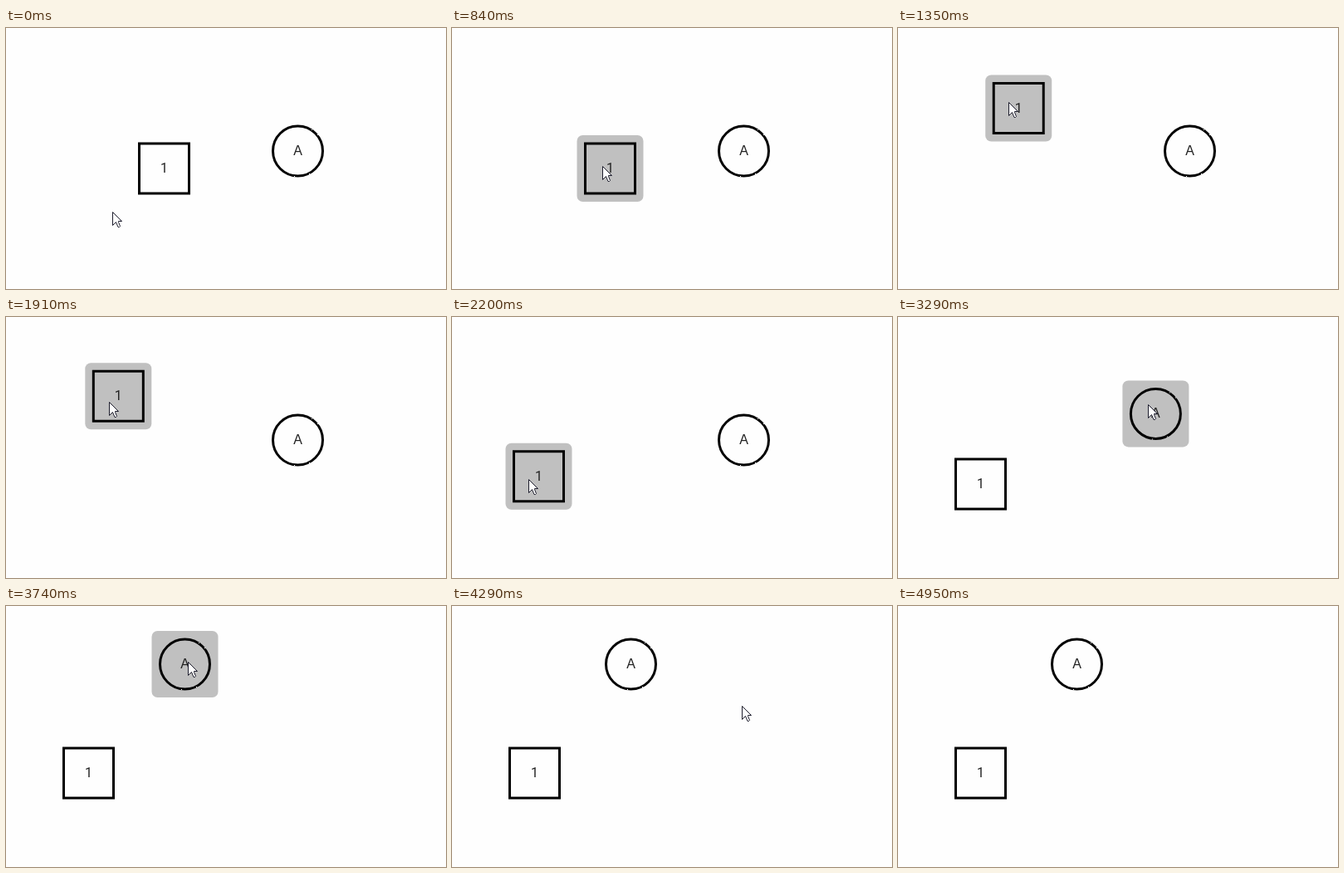
An HTML page for the animation above (5.27 s loop, 530 by 314 pixels).

```html
<!DOCTYPE html>
<html lang="en">
<head>
<meta charset="utf-8">
<title>Dragging shapes</title>
<style>
  html, body { margin: 0; width: 100%; height: 100%; overflow: hidden; background: #fefefe; }
  svg { display: block; width: 530px; height: 314px; }
  text { font: 16px "Liberation Sans", Arial, sans-serif; text-anchor: middle; fill: #222; }
  .digit { font-family: Roboto, sans-serif; }
  .halo { fill: #c0c0c0; }
  .line { fill: none; stroke: #000; stroke-width: 3; }
  .nick { fill: #fff; }
</style>
</head>
<body>
<svg viewBox="0 0 530 314">
  <defs>
    <rect id="halo" x="-40" y="-40" width="80" height="80" rx="7"/>
  </defs>
  <g id="circle">
    <use class="halo" href="#halo"/>
    <circle class="line" r="30"/>
    <path class="nick" d="M16.5-26h1v1h-1z M23.5-20h1v1h-1z M-4.5 30h1v1h-1z M13.5 27h1v1h-1z"/>
    <text y="5">A</text>
  </g>
  <g id="square">
    <use class="halo" href="#halo"/>
    <rect class="line" x="-30" y="-30" width="60" height="60"/>
    <text class="digit" y="5">1</text>
  </g>
  <path id="cursor" fill="#fff" stroke="#1c1c2c"
    d="M.5 .5V16.5L4.5 12.5L7 18.5H8.5L9.5 17.5L7.5 12.5V11.5H11.5Z"/>
</svg>
<script>
const LOOP = 5270;
const FIRST = 245;  // time of the first step
const STEP = 138;   // the picture advances in steps of this length
const LAG = 0.25;   // a dragged shape trails the hand by this many steps

const $ = id => document.getElementById(id);
const clamp = (v, lo, hi) => Math.min(hi, Math.max(lo, v));
const smooth = u => u * u * (3 - 2 * u);

// Eased strokes of the hand, timed in steps; "via" bends the way.
const home = { x: 128, y: 221 };
const strokes = [
  { start: -1,   end: 2.7,  to: { x: 181, y: 166 } },
  { start: 4.1,  end: 9,    to: { x: 127, y: 79.5 } },
  { start: 11.1, end: 14.3, to: { x: 90,  y: 198 }, via: { x: 123, y: 139 } },
  { start: 15.5, end: 19.2, to: { x: 355, y: 145 }, via: { x: 240, y: 140 } },
  { start: 20.4, end: 24.1, to: { x: 219, y: 67 },  via: { x: 287, y: 87 } },
  { start: 26.4, end: 33.9, to: { x: 497, y: 330 }, via: { x: 490, y: 150 } }
];

const shapes = [
  { el: $("square"), x: 190.5, y: 169, grab: 2.7,  drop: 15.5 },
  { el: $("circle"), x: 351.5, y: 148, grab: 20.4, drop: 26.4 }
];

function bend(a, b, c, s) {
  const r = 1 - s;
  return r * r * a + 2 * r * s * b + s * s * c;
}

function hand(step) {
  let from = home;
  for (const { start, end, to, via } of strokes) {
    if (step < end) {
      const s = smooth(clamp((step - start) / (end - start), 0, 1));
      const mid = via || { x: (from.x + to.x) / 2, y: (from.y + to.y) / 2 };
      return { x: bend(from.x, mid.x, to.x, s), y: bend(from.y, mid.y, to.y, s) };
    }
    from = to;
  }
  return from;
}

function place(el, x, y) {
  el.setAttribute("transform", `translate(${x} ${y})`);
}

function draw(t) {
  const step = Math.floor((t - FIRST) / STEP);
  for (const { el, x, y, grab, drop } of shapes) {
    const a = hand(grab);
    const b = hand(clamp(step - LAG, grab, drop));
    place(el, x + b.x - a.x, y + b.y - a.y);
    const held = step >= grab && step < drop;
    el.querySelector(".halo").setAttribute("visibility", held ? "visible" : "hidden");
  }
  const tip = hand(step);
  place($("cursor"), Math.round(tip.x), Math.round(tip.y));
}

const origin = performance.now();
function tick() {
  draw((performance.now() - origin) % LOOP);
  requestAnimationFrame(tick);
}
tick();
</script>
</body>
</html>
```
